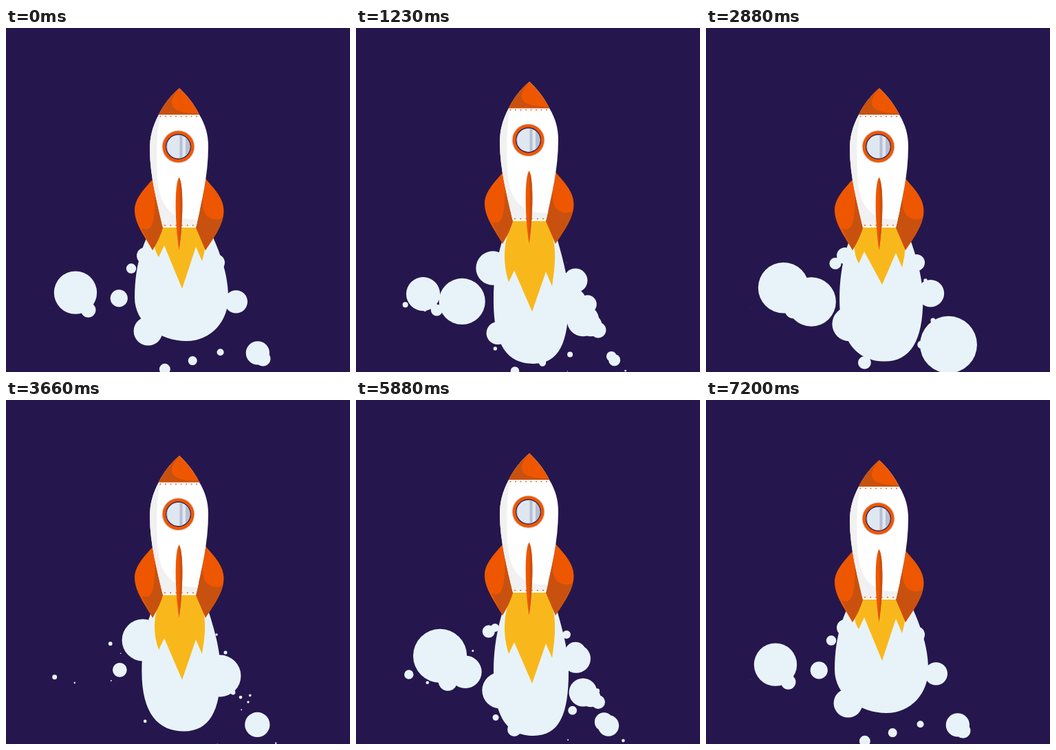
These frames come from a looping animation (500x500 px, 7230 ms). An HTML page:

```html
<!DOCTYPE html>
<html lang="en">
<head>
<meta charset="utf-8">
<title>Rocket</title>
<style>
  html, body { margin: 0; width: 100%; height: 100%; overflow: hidden; background: #25174d; }
  svg { display: block; width: 100vw; height: 100vh; }
</style>
</head>
<body>
<svg viewBox="0 0 500 500">
  <defs>
    <clipPath id="hull"><path d="M252 87.5C240 98 229 111 222 126C213 143 209 158 209 176C209 215 220 255 228 290H276C284 255 294 215 294 172C294 155 290 141 281 126C274 111 263 98 252 87.5Z"/></clipPath>
    <clipPath id="glass"><circle cx="250.5" cy="172.5" r="17"/></clipPath>
  </defs>
  <g fill="#e8f3f9"><path id="plume"/><path id="puffs"/></g>
  <g id="rocket">
    <path id="flame" fill="#f8b81c"/>
    <g fill="#ee5700">
      <path d="M214 219C200 235 187 248 187 265C187 285 203 305 213 323C220 311 225 301 228 290C222 265 217 240 214 219Z"/>
      <path d="M290 219C305 236 316 248 316.500 265C317 285 302 305 290 323L276 290C282 265 287 243 290 219Z"/>
    </g>
    <g fill="#c9510f">
      <path d="M197 291C212 298 218 284 216 231L228 290C225 301 220 311 213 323Z"/>
      <path d="M289 231C283 255 286 272 297 276C303 279 309 279 315 276C311 291 299 309 290 323L276 290C281 270 286 250 289 231Z"/>
    </g>
    <g clip-path="url(#hull)">
      <path fill="#fff" d="M200 80H300V295H200Z"/>
      <path fill="#f1f1f1" d="M200 126H225C218 150 219 185 220 215C222 255 237 281 280 278V288H200Z"/>
      <path fill="#ee5700" d="M200 80H300V126H200Z"/>
      <path fill="#c9510f" d="M252 87.5C246 95 241 101 241 108C241 118 251 124 283 124V126H200V87.5Z"/>
    </g>
    <path fill="none" stroke="#e2632a" stroke-width="2" stroke-linecap="round" stroke-dasharray="0 7.500" d="M224.500 128.600H278"/>
    <path fill="none" stroke="#e2632a" stroke-width="2" stroke-linecap="round" stroke-dasharray="0 8.200" d="M231 286.800H273"/>
    <circle cx="250.5" cy="172.500" r="24.200" fill="#dfe0e4"/>
    <circle cx="250.5" cy="172.500" r="23" fill="#ee5700"/>
    <circle cx="250.5" cy="172.500" r="18.500" fill="#33265c"/>
    <g clip-path="url(#glass)">
      <path fill="#dfe7f1" d="M230 150H270V195H230Z"/>
      <path fill="#b9bfd3" d="M252.500 150H256.500V195H252.500ZM261 150H270V195H261ZM230 150H236C234 165 234 180 238 195H230Z"/>
    </g>
    <path fill="#ee5700" d="M251.500 217C245 226 245 280 251.500 323C258 280 258 226 251.500 217Z"/>
    <path fill="#c9510f" d="M251.500 217C258 226 258 280 251.500 323C253 285 253 240 251.500 217Z"/>
  </g>
</svg>
<script>
const STEP = 30, FRAMES = 240, LOOP = 7230, BEAT = 12;
const byId = id => document.getElementById(id);
const mix = (a, b, k) => a + (b - a) * k;
const frac = v => v - Math.floor(v);
const wave = turns => 0.5 + 0.5 * Math.cos(2 * Math.PI * turns);
const easeInOut = k => k < 0.5 ? 4 * k ** 3 : 1 - 4 * (1 - k) ** 3;
const circle = (x, y, r) => r > 0 ? `M${x - r} ${y}a${r} ${r} 0 1 1 ${2 * r} 0a${r} ${r} 0 1 1 ${-2 * r} 0Z` : '';

function puffPath(t) {
  const age = frac(7 * t + 0.443);
  const reach = 1 - (1 - age) ** 4.5;
  const size = (1 - age) ** 0.55 * Math.min(1, age / 0.02);
  const late = frac(15 * t - 0.03);
  const crumb = 0.2 * (1 - late) * Math.min(1, late / 0.12);

  // A puff thrown outward that shrinks, and a crumb further along the same line
  const trail = (x0, y0, x1, y1, r) => {
    const at = (k, radius) => circle(mix(x0, x1, k), mix(y0, y1, k), radius);
    return at(reach, r * size) + at(1.3 + 0.3 * late, r * crumb);
  };

  let d = trail(152, 354, 97, 387, 43)
    + trail(153, 408, 117, 410, 15)
    + trail(214, 396, 206, 444, 29)
    + trail(208, 318, 180, 352, 10)
    + trail(300, 345, 337, 402, 23)
    + trail(342, 450, 376, 483, 15);
  for (let i = 0; i < 3; i++) {
    d += trail(229 + 45 * i, 455 - 16 * i, 231 + 40 * i, 499 - 12 * i, 11 - 2 * i);
  }

  // Clouds that swell and sink back
  const leftCloud = wave(4 * t - 0.56) ** 0.6;
  const rightCloud = wave(11 * t - 0.3) ** 1.2;
  d += circle(mix(166, 153, leftCloud), mix(392, 398, leftCloud), 9 + 27 * leftCloud);
  d += circle(mix(372, 350, rightCloud), mix(478, 458, rightCloud), 6 + 40 * rightCloud);

  const shoulder = wave(15 * t - 0.65) ** 3;
  const collar = wave(15 * t);
  for (const side of [-1, 1]) {
    d += circle(255 + 56 * side, 375 + 26 * side, 31 * shoulder);
    d += circle(254 + 52 * side, 336 + 5 * side, 12 * collar);
  }

  const cluster = wave(14 * t - 0.36) ** 3;
  for (let i = 0; i < 3; i++) {
    d += circle(330 + 11 * i, 425 + 7 * i, 24 * 0.7 ** i * cluster);
  }
  return d + circle(319, 367, 18 * cluster);
}

function flamePath(thrust, sway) {
  const idle = sway * (1 - thrust);
  const side = 46 * thrust + 9 * idle;
  const left = 43 + side, right = 49 + side;
  const notch = 26 + side, tip = 89 + 43 * thrust - 6 * idle;
  return `M228 290c-13 ${left * 0.28} -16 ${left * 0.65} -6 ${left}L230 ${290 + notch}L256 ${290 + tip}`
    + `L276 ${292 + notch}L285 ${290 + right}C290 ${290 + right * 0.65} 294 ${290 + right * 0.3} 276 290Z`;
}

function plumePath(thrust, sway) {
  const slim = mix(0.55 * sway, 1, thrust);
  const l = 187 + 13 * slim, r = 323 - 14 * slim;
  const b = 455 + 33 * mix(0.9 * sway, 1, thrust);
  const x = 262 - 4 * slim, mid = mix(385, b, 0.1);
  return `M228 265C${l + 14} 302 ${l} 340 ${l} ${mid}C${l} ${b - 25} ${x - 37} ${b} ${x} ${b}`
    + `C${x + 37} ${b} ${r} ${b - 30} ${r} ${mid}C${r} 350 ${r - 18} 310 282 265Z`;
}

function draw(ms) {
  const frame = Math.floor((ms % LOOP) / STEP) % FRAMES;
  const t = frame / FRAMES;

  // Thrust up and back within each beat, then rest; the last beat stays at rest
  const resting = frame >= FRAMES - BEAT;
  const ramp = resting ? 0 : Math.max(0, 1 - Math.abs(frame % BEAT - 4) / 4);
  const lift = easeInOut(ramp ** 0.85);
  const thrust = lift * (1 + lift * (1 - lift));
  const sway = Math.min(1, wave(6 * t - 0.5) * 1.1);

  byId('rocket').setAttribute('transform', `translate(0 ${-10 * lift})`);
  byId('flame').setAttribute('d', flamePath(thrust, sway));
  byId('plume').setAttribute('d', plumePath(thrust, sway));
  byId('puffs').setAttribute('d', puffPath(t));
}

const start = performance.now();
function tick() {
  draw(performance.now() - start);
  requestAnimationFrame(tick);
}
draw(0);
requestAnimationFrame(tick);
</script>
</body>
</html>
```
